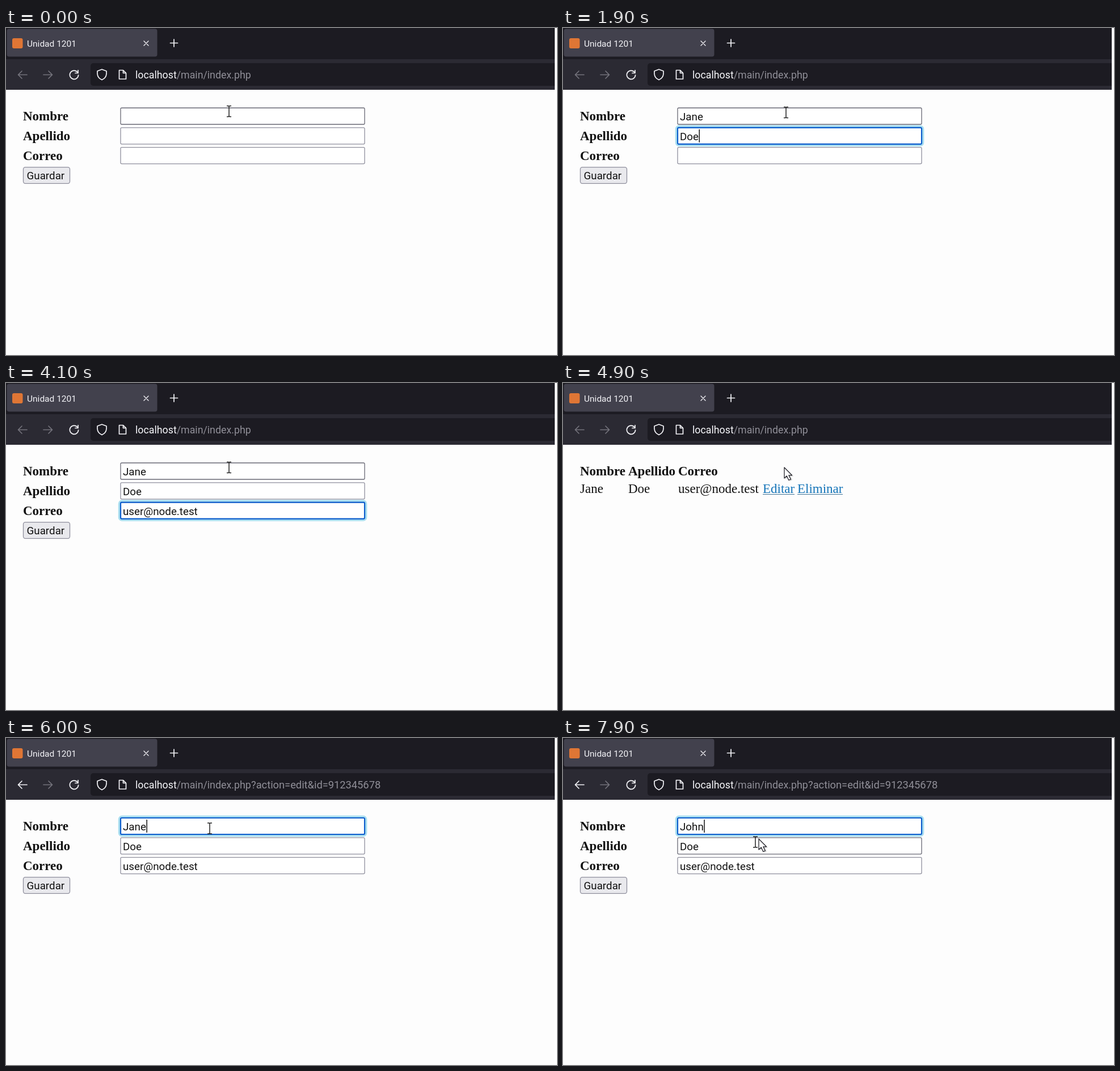
These frames come from a looping animation (971 by 577 pixels, 8 s). An HTML page:

```html
<!DOCTYPE html>
<html lang="es">
<head>
<meta charset="utf-8">
<title>Formulario</title>
<style>
  html, body { margin: 0; width: 100%; height: 100%; overflow: hidden; background: #fff; }
  svg { display: block; width: 100%; height: 100%; }
  text { white-space: pre; }
  .ui { font-family: Roboto, sans-serif; font-size: 18.8px; fill: #111; }
  .tab { font-size: 15.5px; fill: #f4f4f8; }
  .url { font-size: 17.8px; fill: #908f98; }
  .host { fill: #f8f8fc; }
  .query { font-size: 18.3px; }
  .page { font-family: "Liberation Serif", serif; font-size: 23px; fill: #111; }
  .head { font-weight: bold; }
  .link { fill: #1474b8; }
  .icon { fill: none; stroke: #f4f4f8; stroke-width: 1.7; stroke-linecap: round; stroke-linejoin: round; }
  .off { stroke: #74737c; }
  .box { fill: #fff; stroke: #8f8f9d; stroke-width: 1.3; }
  .box.hover { stroke: #686874; }
</style>
</head>
<body>
<svg viewBox="0 0 971 577">
  <rect width="967" height="577" fill="#fdfdfd"/>
  <rect width="967" height="109" fill="#2b2a33"/>
  <rect width="967" height="55" fill="#1c1b22"/>
  <rect x="1.5" y="1.5" width="265" height="49" rx="4" fill="#42414d"/>
  <rect x="11" y="18" width="18.5" height="18" rx="3" fill="#df7635"/>
  <text class="ui tab" x="37" y="32.5">Unidad 1201</text>
  <path d="M149 67a5 5 0 0 1 5-5H967V102H154a5 5 0 0 1-5-5Z" fill="#1c1b22"/>
  <g class="icon">
    <path d="M243 23l8 8m0-8l-8 8" stroke-width="1.3"/>
    <path d="M289.5 26.5h13m-6.5-6.5v13"/>
    <path id="back" d="M37 82.5H21.5m6.5-6.5l-6.5 6.5l6.5 6.5"/>
    <path class="off" d="M66 82.5H81.5m-6.5-6.5l6.5 6.5l-6.5 6.5"/>
    <path d="M126 78a7.6 7.6 0 1 0 1.6 5M127 74.5V79.500h-5"/>
    <path d="M169 73l8 3v5q-.5 7-8 10.500q-7.500-3.500-8-10.500v-5Z"/>
    <path d="M199.500 74.500h7l5 5V90h-12ZM206.500 74.500v5h5"/>
  </g>
  <text class="ui url" x="228" y="89"><tspan class="host">localhost</tspan>/main/index.php</text>
  <text class="ui url query" id="query" x="432" y="89">?action=edit&amp;id=912345678</text>

  <g id="form">
    <g id="rows"></g>
    <rect x="30.500" y="245.700" width="82" height="28.600" rx="3.500" fill="#e9e9ed" stroke="#8f8f9d" stroke-width="1.300"/>
    <text class="ui" x="36.500" y="267">Guardar</text>
    <rect id="caret" width="1.500" height="23" fill="#111"/>
  </g>

  <g id="list" class="page">
    <g class="head">
      <text x="30" y="163">Nombre</text>
      <text x="115" y="163">Apellido</text>
      <text x="203" y="163">Correo</text>
    </g>
    <text x="30" y="194">Jane</text>
    <text x="115" y="194">Doe</text>
    <text x="203" y="194">user@node.test</text>
    <g class="link">
      <text x="352" y="194">Editar</text>
      <text x="413" y="194">Eliminar</text>
    </g>
    <path d="M352 196.500h56m5 0h80" stroke="#3f7396" stroke-width="1.200"/>
  </g>

  <path id="beam" d="M-4-9.500h3l1 1l1-1h3M0-8.500V8.500M-4 9.500h3l1-1l1 1h3" fill="none" stroke="#222" stroke-width="1.500"/>
  <g id="arrow" stroke-linejoin="round">
    <path d="M2 2v19l4.500-4l3.500 7l4-2l-3.500-6.500h6Z" fill="#000" opacity=".18"/>
    <path d="M0 0v19l4.300-4l3.500 7.500l3.500-1.700l-3.500-7h5.700Z" fill="#fff" stroke="#25252c" stroke-width="1.300"/>
  </g>
  <path id="hand" d="M-1.500 12V1.500q1.500-2.500 3.200 0V8l8 2q2 1 1.500 4l-1.500 8H0l-6-8q0-3 4.500 0Z" fill="#fff" stroke="#25252c" stroke-width="1.300"/>
</svg>
<script>
const LOOP = 8000, STEP = 100, TEXT_X = 206;
const $ = id => document.getElementById(id);

$('rows').innerHTML = ['Nombre', 'Apellido', 'Correo'].map((label, i) => {
  const y = 141 + i * 34.8;
  return `<text class="page head" x="30" y="${y + 22}">${label}</text>
    <rect class="box" x="202" y="${y}" width="430" height="29" rx="2"/>
    <g class="ring" fill="none">
      <rect x="199.500" y="${y - 2.500}" width="435" height="34" rx="5" stroke="#a9def0" stroke-width="3.500"/>
      <rect x="202" y="${y}" width="430" height="29" rx="2" stroke="#0b5ccc" stroke-width="2.200"/>
    </g>
    <text class="ui value" x="${TEXT_X}" y="${y + 22}"></text>`;
}).join('');
const boxes = document.querySelectorAll('.box');
const rings = document.querySelectorAll('.ring');
const values = document.querySelectorAll('.value');

// Each step changes some of the state: page, focused row, caret, row values.
const steps = [
  [0, { page: 'form', edit: false, focus: -1, caret: false, 0: '', 1: '', 2: '' }],
  [200, { focus: 0, caret: true }],
  [500, { caret: false }],
  [700, { caret: true, 0: 'J' }],
  [800, { 0: 'Ja' }],
  [900, { 0: 'Jan' }],
  [1000, { 0: 'Jane' }],
  [1300, { caret: false }],
  [1400, { focus: 1, caret: true }],
  [1700, { 1: 'D' }],
  [1800, { 1: 'Do' }],
  [1900, { 1: 'Doe' }],
  [2200, { focus: 2 }],
  [2500, { caret: false }],
  [2700, { caret: true }],
  [2800, { 2: 'us' }],
  [2900, { 2: 'use' }],
  [3000, { 2: 'user' }],
  [3300, { caret: false }],
  [3500, { caret: true, 2: 'user@' }],
  [3800, { 2: 'user@node' }],
  [3900, { 2: 'user@node.test' }],
  [4100, { caret: false }],
  [4400, { page: 'list', focus: -1 }],
  [5300, { page: 'form', edit: true }],
  [5800, { focus: 0, caret: true }],
  [6200, { caret: false }],
  [6500, { caret: true, 0: 'Jan' }],
  [6600, { 0: 'Ja' }],
  [6700, { 0: 'J' }],
  [6800, { 0: '' }],
  [7000, { 0: 'J' }],
  [7200, { 0: 'Jo' }],
  [7300, { 0: 'Joh' }],
  [7400, { 0: 'John' }],
  [7600, { caret: false }],
  [7800, { caret: true }]
];

// Pointer keys: time, x, y
const path = [
  [0, 393, 147], [100, 393, 149], [4300, 393, 149], [4400, 390, 149], [4900, 390, 149],
  [5100, 380, 183], [5300, 378, 185], [5700, 359, 159.5], [7700, 359, 159.5], [7900, 339, 183.5], [LOOP, 339, 183.5]
];

function pointerAt(t) {
  const i = Math.max(1, path.findIndex(key => key[0] > t));
  const [t0, x0, y0] = path[i - 1], [t1, x1, y1] = path[i];
  const k = (t - t0) / (t1 - t0);
  return [x0 + (x1 - x0) * k, y0 + (y1 - y0) * k];
}

function show(el, on) { el.style.display = on ? '' : 'none'; }

function place(el, on, x, y) {
  show(el, on);
  el.setAttribute('transform', `translate(${x} ${y})`);
}

function render(time) {
  const t = Math.floor(time % LOOP / STEP) * STEP;
  const s = Object.assign({}, ...steps.filter(step => step[0] <= t).map(step => step[1]));
  const isList = s.page === 'list';
  const [x, y] = pointerAt(t);

  show($('form'), !isList);
  show($('list'), isList);
  show($('query'), s.edit);
  $('back').classList.toggle('off', !s.edit);

  boxes.forEach((box, i) => {
    const top = 141 + i * 34.8;
    box.classList.toggle('hover', y > top && y < top + 29);
    show(rings[i], s.focus === i);
    if (values[i].textContent !== s[i]) values[i].textContent = s[i];
  });

  const caretOn = s.focus >= 0 && s.caret;
  show($('caret'), caretOn);
  if (caretOn) {
    $('caret').setAttribute('x', TEXT_X + .5 + values[s.focus].getComputedTextLength());
    $('caret').setAttribute('y', 144 + s.focus * 34.8);
  }

  const overLink = isList && t >= 5100;
  const leaving = t >= 7900;
  place($('beam'), !isList, x, y);
  place($('arrow'), isList && !overLink || leaving, leaving ? x + 6 : x, leaving ? y - 5.5 : y);
  place($('hand'), overLink, x, y);
}

function tick() {
  render(performance.now());
  requestAnimationFrame(tick);
}
tick();
</script>
</body>
</html>
```
